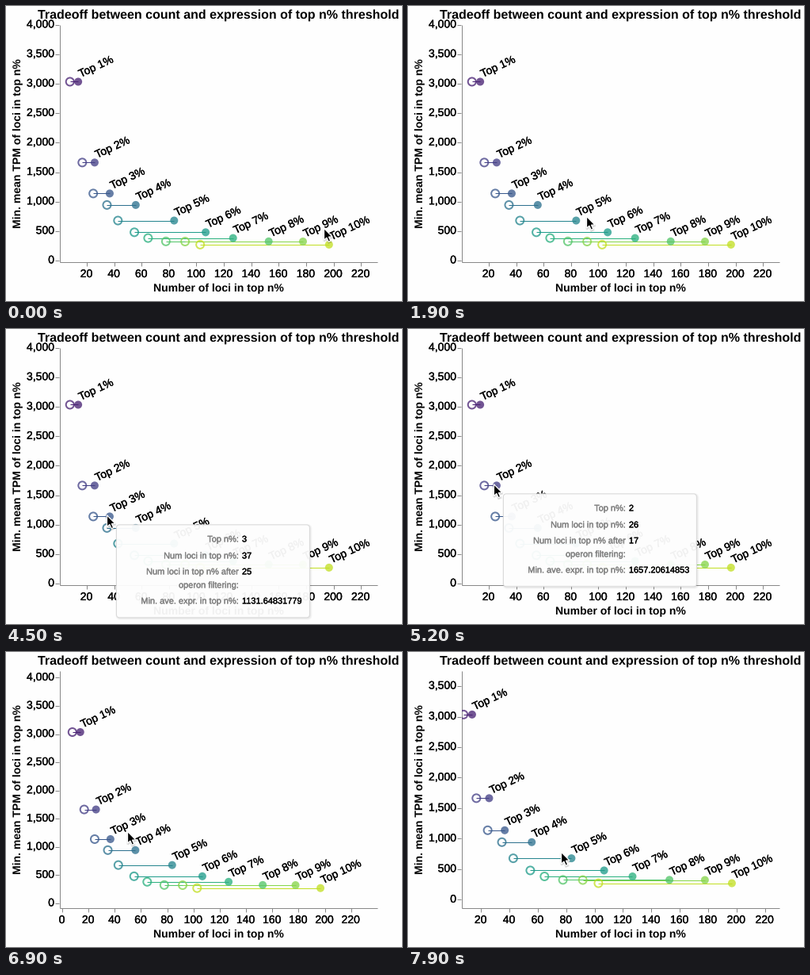
A matplotlib script that plays this animation: 500x372 px, repeating every 8000 ms.

```python
import numpy as np
import matplotlib.pyplot as plt
from matplotlib.animation import FuncAnimation
from matplotlib.patches import Circle, FancyBboxPatch, Polygon, Rectangle
from matplotlib.patheffects import withStroke

W, H, DPI = 500, 372, 100
FRAMES, STEP = 80, 100
PT = 72 / DPI  # points per pixel
LEFT, RIGHT, TOP, BOTTOM = 68, 468, 23, 323
ANGLE = 25

# Data to pixels before any zoom: pixel of zero and pixels per unit
ORIGIN = np.array([66.9, 320.5])
SCALE = np.array([1.7306, -0.0743])

plt.rcParams["font.family"] = "Liberation Sans"
plt.rcParams["text.hinting"] = "none"

loci = np.array([14, 26, 37, 56, 84, 107, 127, 153, 178, 197])
filtered = np.array([8, 17, 25, 35, 43, 55, 65, 78, 92, 103])
tpm = np.array([3028.41752236, 1657.20614853, 1131.64831779, 936.71920485,
                672.30581942, 473.18260574, 375.09416328, 318.52097361,
                316.04825197, 263.87140592])
colors = plt.get_cmap("viridis")(np.arange(1, 11) / 11)

fig = plt.figure(figsize=(W / DPI, H / DPI), dpi=DPI, facecolor="#fefefe")
ax = fig.add_axes([0, 0, 1, 1])
ax.set_xlim(0, W)
ax.set_ylim(H, 0)
ax.axis("off")
plot_area = Rectangle((LEFT, TOP), RIGHT - LEFT, BOTTOM - TOP,
                      transform=ax.transData)
live = []


def hover(rank, start, stay):
    """Rest the pointer on one filled point."""
    x, y = ORIGIN + SCALE * (loci[rank - 1], tpm[rank - 1]) - (4, 2)
    return [(start, x, y), (start + stay, x, y)]


def pointer_path():
    path = [(0, 401, 280)]
    for i, rank in enumerate(range(10, 5, -1)):
        path += hover(rank, 200 + 350 * i, 200)
    path += [(1900, 225, 265), *hover(5, 2100, 700), (2900, 198, 262)]
    path += hover(4, 3200, 300) + hover(3, 3700, 800) + hover(2, 4900, 700)
    path += [(6000, 105, 126), (ZOOM_AT, *ANCHOR), (7150, *ANCHOR)]
    return np.array(path + [(DRAG_AT, *GRAB), (7900, 193, 252)]).T


ZOOM_AT, DRAG_AT = 6500, 7400
ANCHOR = np.array([153, 226])
GRAB = np.array([201, 264])
PATH = pointer_path()


def pointer(t):
    return np.array([np.interp(t, PATH[0], c) for c in PATH[1:]])


def view(t):
    """Zoom out and in around the pointer, then drag the plot along."""
    zoom = np.interp(t, [ZOOM_AT, ZOOM_AT + 400, ZOOM_AT + 700],
                     [1, 0.9577, 1.0357])
    pan = pointer(t) - GRAB if t > DRAG_AT else 0
    return ANCHOR + (ORIGIN - ANCHOR) * zoom + pan, SCALE * zoom


def keep(artist, clip=False):
    if clip:
        artist.set_clip_path(plot_area)
    live.append(artist)
    return artist


def text(x, y, s, px=14, weight="normal", color="black", **kw):
    heavier = [withStroke(linewidth=0.3 * PT, foreground=color)]
    effects = heavier if weight == "normal" else None
    return ax.text(x, y, s, fontsize=px * PT, va="baseline", weight=weight,
                   color=color, path_effects=effects, **kw)


def line(xs, ys, color="#888888", z=1):
    return ax.plot(xs, ys, color=color, lw=PT, zorder=z,
                   solid_capstyle="butt")[0]


def draw_axes(origin, scale):
    for v in range(0, 300, 20):
        x = origin[0] + scale[0] * v
        if LEFT <= x <= RIGHT:
            tick = np.floor(x) + 0.5
            keep(line([tick, tick], [BOTTOM, BOTTOM + 5]))
            keep(text(x, 342, str(v), ha="center"))
    for v in range(0, 5000, 500):
        y = origin[1] + scale[1] * v
        if TOP <= y <= BOTTOM:
            tick = np.floor(y) + 0.5
            keep(line([LEFT - 6, LEFT - 1], [tick, tick]))
            keep(text(61, y + 4, f"{v:,}", ha="right"))


def draw_marks(xa, xb, ys):
    c, s = np.cos(np.radians(ANGLE)), np.sin(np.radians(ANGLE))
    for i, (a, b, y, color) in enumerate(zip(xa, xb, ys, colors)):
        ring = Circle((a, y), 5, fill=False, ec=color, lw=2 * PT, alpha=0.77,
                      zorder=3)
        dot = Circle((b, y), 5, fc=color, lw=0, alpha=0.77, zorder=4)
        keep(line([a, b], [y, y], color, 2), clip=True)
        keep(ax.add_patch(ring), clip=True)
        keep(ax.add_patch(dot), clip=True)
        keep(text(b + 5 * c - 3.5 * s, y - 5 * s - 3.5 * c, f"Top {i + 1}%",
                  rotation=ANGLE, rotation_mode="anchor", ha="left",
                  zorder=5), clip=True)


def draw_tooltip(i, x, y):
    value = f"{tpm[i]:.8f}"
    width = 167.5 + 11 * (0.556 * (len(value) - 1) + 0.278)

    def box(offset, grow, **kw):
        style = f"round,pad={grow},rounding_size={4 + grow}"
        keep(ax.add_patch(FancyBboxPatch((x + offset, y + offset), width, 117,
                                         boxstyle=style, **kw)))

    for grow in (2, 1, 0):
        box(1.5, grow, fc="black", lw=0, alpha=0.03, zorder=6)
    box(0.5, 0, fc="white", lw=0, alpha=0.95, zorder=7)
    box(0.5, 0, fc="none", ec="#d8d8d8", lw=PT, zorder=7)
    rows = [(22, "Top n%:", i + 1),
            (43, "Num loci in top n%:", loci[i]),
            (63, "Num loci in top n% after", filtered[i]),
            (80, "operon filtering:", ""),
            (100, "Min. ave. expr. in top n%:", value)]
    for dy, key, val in rows:
        keep(text(x + 155, y + dy, key, 11, ha="right", color="#808080",
                  zorder=8))
        keep(text(x + 159, y + dy, str(val), 11, ha="left", zorder=8))


def draw_pointer(tip):
    arrow = tip + (0.5, 0.3) + np.array([
        (0, 0), (0, 15), (3.4, 11.8), (5.7, 17), (8.3, 15.9), (6, 10.8),
        (10.6, 10.8)])
    keep(ax.add_patch(Polygon(arrow + (0.3, 1.2), fc="black", ec="black",
                              lw=2.5 * PT, alpha=0.12, zorder=9)))
    keep(ax.add_patch(Polygon(arrow, fc="black", ec="white", lw=1.3 * PT,
                              zorder=10)))


def draw(n):
    while live:
        live.pop().remove()
    t = n * STEP
    origin, scale = view(t)
    tip = pointer(t)
    xa = origin[0] + scale[0] * filtered
    xb = origin[0] + scale[0] * loci
    ys = origin[1] + scale[1] * tpm
    draw_axes(origin, scale)
    draw_marks(xa, xb, ys)
    gaps = np.hypot(tip[0] - xb, tip[1] - ys)
    nearest = int(np.argmin(gaps))
    if gaps[nearest] < 6:
        draw_tooltip(nearest, *(tip + 12))
    draw_pointer(tip)
    return live


text(268, 16, "Tradeoff between count and expression of top n% threshold", 16,
     ha="center", weight="bold")
text(268, 360, "Number of loci in top n%", ha="center", weight="bold")
text(19, 173, "Min. mean TPM of loci in top n%", rotation=90,
     rotation_mode="anchor", ha="center", weight="bold")
line([LEFT - 0.5, LEFT - 0.5], [TOP + 1, BOTTOM])
line([LEFT, RIGHT + 1], [BOTTOM - 0.5, BOTTOM - 0.5])

anim = FuncAnimation(fig, draw, frames=FRAMES, init_func=lambda: draw(0),
                     interval=STEP, repeat=True, repeat_delay=0, blit=False)
plt.show()
```
